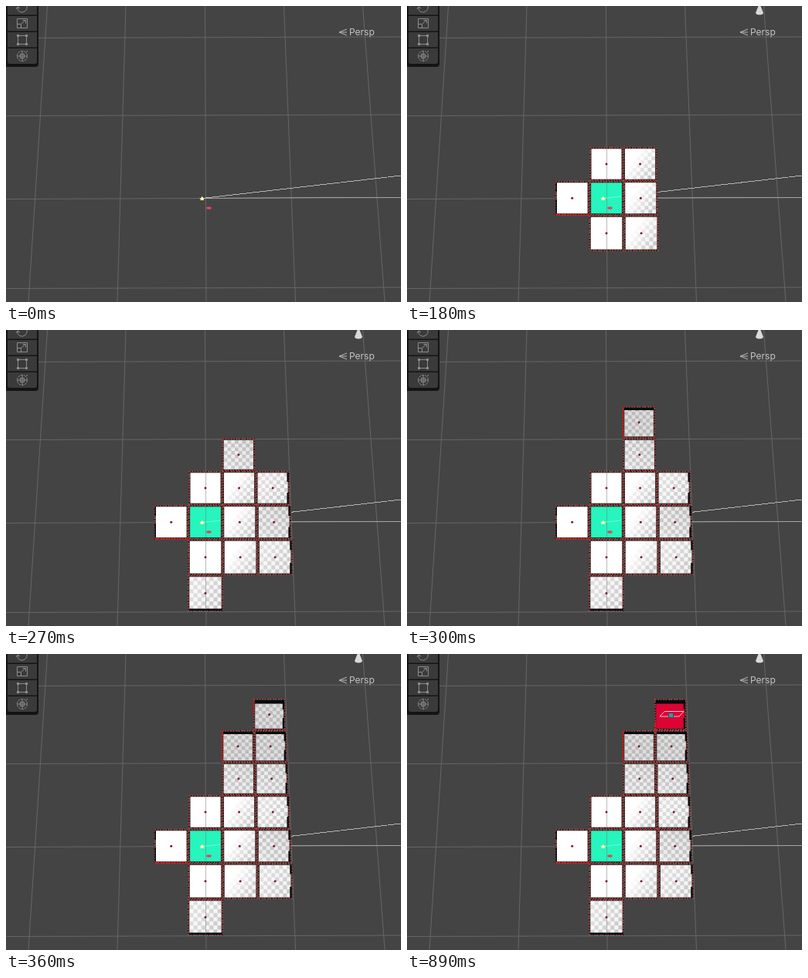
An HTML page for the animation above (2.1 s loop, 511x384 px).

```html
<!DOCTYPE html>
<html lang="en">
<head>
<meta charset="utf-8">
<title>Room generation</title>
<style>
  html, body { margin: 0; width: 100%; height: 100%; overflow: hidden; background: #444; }
  svg { display: block; }
  text { font: 12px Inter, Roboto, sans-serif; fill: #c4c4c4; }
</style>
</head>
<body>
<svg width="511" height="384" viewBox="0 0 511 384">
  <defs>
    <pattern id="checker" width=".25" height=".25" patternContentUnits="objectBoundingBox">
      <path fill="#f4f4f4" d="M0 0h.25v.25h-.25z"/>
      <path fill="#c8c8c8" d="M.125 0h.125v.125h-.125zM0 .125h.125v.125h-.125z"/>
    </pattern>
    <linearGradient id="fade" x1="0" y1="0" x2="1" y2=".7">
      <stop offset=".35" stop-color="#fff"/>
      <stop offset="1" stop-color="#fff" stop-opacity="0"/>
    </linearGradient>
    <linearGradient id="shade" x1="0" y1="1" x2="1" y2="0">
      <stop offset="0" stop-color="#fff" stop-opacity=".5"/>
      <stop offset=".4" stop-color="#bbb" stop-opacity=".1"/>
      <stop offset="1" stop-color="#888" stop-opacity=".2"/>
    </linearGradient>
  </defs>

  <path fill="#444" d="M0 0h511v384H0z"/>
  <g fill="none" stroke="#666">
    <path d="M53.500 0L29 384M155 0L144 384M257.500 0L259 384M359.500 0L374.500 384M461.500 0L490 384"/>
    <path d="M0 41.500L511 40M0 142.500L511 141M0 250.500L511 248.500M0 366.500L511 365"/>
    <path stroke="#a4a4a4" d="M254 249.500L403 248.500L511 248.500"/>
    <path stroke="#b4b4b4" shape-rendering="crispEdges" d="M254 249.500L511 220"/>
  </g>

  <g id="tools">
    <rect x="-4" y="-5" width="46" height="84" rx="4" fill="#141414"/>
    <path fill="#3a3a3a" d="M2 0h38v11.500H2zM2 13h38v19.500H2zM2 34h38v19.500H2zM2 55h38v17q0 3-3 3H5q-3 0-3-3z"/>
    <g fill="none" stroke="#8c8c8c">
      <path d="M15 1q-1 4 2.500 6.500q4 2 7.500-1q3-3 2-6.500M13 4l2-3l3 2"/>
      <path d="M14.500 16.500h13v12h-13zM14.500 23.500h5v5M20 23l5-4.500M21.500 18.500h4v4"/>
      <path d="M17 38.500h8M17 49.500h8M15.500 40v8M26.500 40v8"/>
      <circle cx="21" cy="65" r="6.500" stroke-dasharray="3 1"/>
      <path d="M14 65h14M21 58v14M18.500 62.500h5v5h-5zM26 60l2-2"/>
    </g>
    <path fill="#8c8c8c" d="M14 37h3v3h-3zM25 37h3v3h-3zM14 48h3v3h-3zM25 48h3v3h-3z"/>
  </g>

  <path fill="none" stroke="#b8b8b8" d="M441 30L431 34L441 38M431 34h10"/>
  <text x="444" y="38">Persp</text>
  <path id="cone" fill="#dadada" d="M454.500 0h3L461 9q-1 2.500-5 2.500t-5-2.500z"/>

  <g id="tiles"></g>
  <g id="marks" fill="none" stroke="#f00c0c"></g>

  <path fill="#ffefa0" d="M250 249h2.500l1-2.500 1 2.500h3l-2 1.500 1 1.500h-5.500l1-1.500z"/>
  <path fill="#fff" d="M253 248h2v2h-2z"/>
  <ellipse cx="262.500" cy="262" rx="3.300" ry="1.800" fill="#d84a58"/>
</svg>

<script>
const LOOP = 2100, GONE = 860, FINISH = 890;
const rowTops = [58, 99, 140.5, 183, 227, 271.5, 318, 365];

// [column, row, time shown, look]
const rooms = [
  [-1, 4, 120, 'white'], [0, 4, 120, 'start'],
  [0, 3, 150, 'white'], [1, 4, 150, 'fade'], [0, 5, 150, 'white'],
  [1, 3, 180, 'fade'], [1, 5, 180, 'fade'],
  [2, 4, 210, 'shade'], [0, 6, 210, 'pale'],
  [2, 3, 240, 'pale'], [2, 5, 240, 'pale'],
  [1, 2, 270, 'shade'], [1, 1, 300, 'dim'],
  [2, 2, 330, 'shade'], [2, 1, 330, 'dim'], [2, 0, 360, 'dim']
];

const fills = { white: '#fff', start: '#26f5bd', end: '#dc0433' };
const overlays = {
  fade: { fill: 'url(#fade)' },
  pale: { fill: 'url(#fade)', opacity: 0.4 },
  shade: { fill: 'url(#shade)' },
  dim: { fill: '#888', opacity: 0.2 }
};
const timed = [];

function add(parent, tag, attrs) {
  const el = document.createElementNS('http://www.w3.org/2000/svg', tag);
  for (const key in attrs) el.setAttribute(key, attrs[key]);
  return parent.appendChild(el);
}

function show(el, from, to = LOOP) {
  timed.push({ el, from, to });
  return el;
}

function addRoom(parent, col, row, look) {
  const w = 41.3 + row * 0.76;
  const cx = 258 + col * w, x = cx - w / 2;
  const y = rowTops[row], h = rowTops[row + 1] - y;
  const g = add(parent, 'g', {});
  const box = (inset, attrs) => add(g, 'rect', {
    x: x + inset, y: y + inset, width: w - 2 * inset, height: h - 2 * inset, ...attrs
  });
  const dash = (color, pattern) => box(0.8, {
    fill: 'none', stroke: color, 'stroke-width': 1.5, 'stroke-dasharray': pattern
  });
  const wall = d => add(g, 'path', { d, fill: '#070b10' });

  box(0, { fill: '#2c1c1a' });
  dash('#8a7468', '1.5 2');
  dash('#b02830', '2 4.500');
  box(2.3, { fill: fills[look] || 'url(#checker)' });
  if (overlays[look]) box(2.3, overlays[look]);

  // Wall edges seen in perspective
  if (row < 2) wall(`M${x + 2} ${y + 2}h${w - 4}v${row ? 3 : 4.5}h${-w + 4}z`);
  if (col > 1) wall(`M${x + w - 3.5} ${y + 2}h2.300v12h-2.300zM${x + w - 3.5} ${y + h - 16}h2.300v14h-2.300z`);
  if (col < 0) wall(`M${x + 1} ${y + 2}h1.500v12h-1.500zM${x + 1} ${y + 24}h1.500v18h-1.500z`);
  if (row === 6) wall(`M${x + 2} ${y + h - 3.5}h${w - 3}v2.500h${-w + 3}z`);

  if (look === 'end') {
    add(g, 'path', { d: 'M333 74.500H358L352 81H327z', fill: 'none', stroke: '#f3c5ce' });
    add(g, 'path', { d: 'M338.500 76.500h6v6h-6z', fill: '#5b859d', stroke: '#344c61' });
    return g;
  }
  if (col === 0) add(g, 'path', { d: `M258.500 ${y + 2}v${h - 4}`, stroke: '#777', opacity: 0.5 });
  if (look === 'start') {
    add(g, 'path', { d: 'M254 249.500L278 247', stroke: '#b0fff0', opacity: 0.5 });
  } else {
    add(g, 'circle', { cx, cy: y + h / 2, r: 1.5, fill: '#7c1830' });
  }
  return g;
}

const tiles = document.getElementById('tiles');
for (const [col, row, from, look] of rooms) {
  show(addRoom(tiles, col, row, look), from, row === 0 ? GONE : LOOP);
}
show(addRoom(tiles, 2, 0, 'end'), FINISH);

const marks = document.getElementById('marks');
const mark = (d, from, to) => show(add(marks, 'path', { d }), from, to);
mark('M251 227.500H280V246M236 271.500H264', 120, 150);
mark('M192 271.500H237', 150);
mark('M279.500 100V140', 300);
mark('M320.500 60V78', 360, GONE);
mark('M321.500 88V101', FINISH);
show(document.getElementById('cone'), 120);

function render(time) {
  for (const { el, from, to } of timed) {
    el.style.display = time >= from && time < to ? '' : 'none';
  }
}

const start = performance.now();
function tick() {
  render((performance.now() - start) % LOOP);
  requestAnimationFrame(tick);
}
tick();
</script>
</body>
</html>
```
